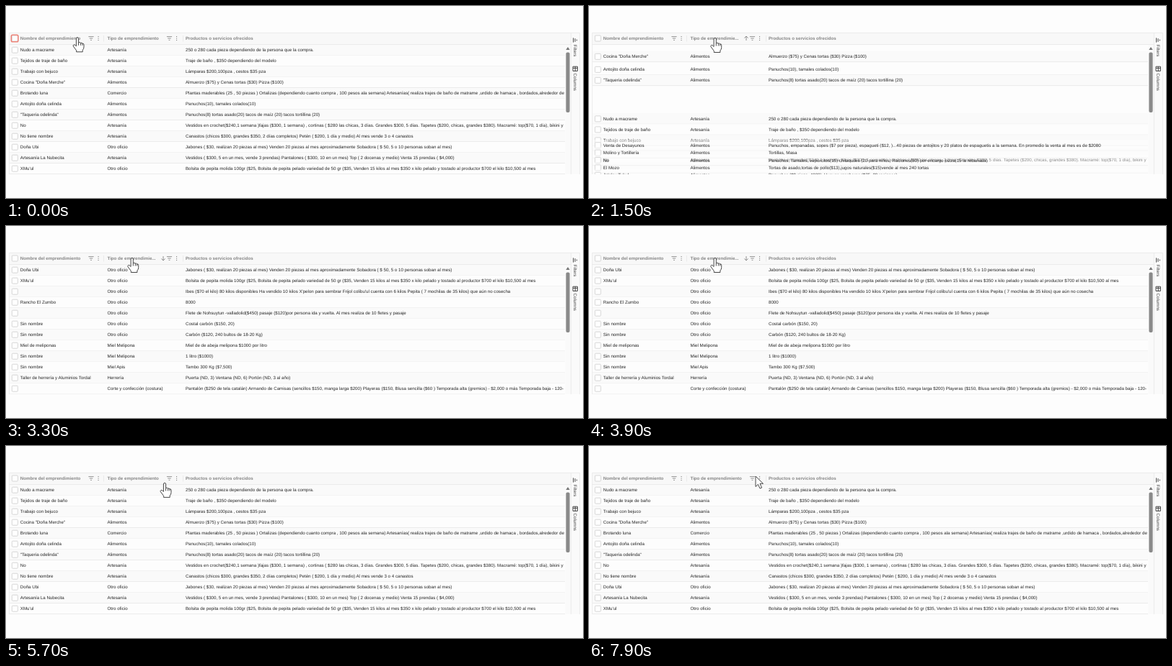
These frames come from a looping animation (800x267 px, 8000 ms). An HTML page:

```html
<!DOCTYPE html>
<html lang="es">
<head>
<meta charset="utf-8">
<title>Tabla de emprendimientos</title>
<style>
html, body { margin: 0; width: 100%; height: 100%; overflow: hidden; background: #fdfdfd; }
svg { display: block; width: 100vw; height: 100vh; }
text { font: 6.173px "Liberation Sans", Arial, sans-serif; fill: #262626; text-rendering: geometricPrecision; white-space: pre; }
.head text { font-weight: bold; fill: #858585; }
.icon { fill: none; stroke: #777; stroke-width: .8; }
.box { fill: #fff; stroke: #cdcdcd; stroke-width: .8; }
.line { stroke: #e8e8e8; stroke-width: .8; }
.side { fill: #444; }
.dark { stroke: #444; stroke-width: 1; }
.cursor { fill: #fff; stroke: #333; stroke-width: .9; stroke-linejoin: round; }
</style>
</head>
<body>
<svg viewBox="0 0 800 267">
  <defs>
    <clipPath id="body"><rect x="4" y="53.5" width="771" height="180.5"/></clipPath>
    <g id="menu">
      <path class="icon" d="M-3.6 -2.4H3.6M-2.2 0H2.2M-.9 2.4H.9"/>
      <path d="M9.5 -3h1.1v1.1h-1.1zM9.5 -.5h1.1v1.1h-1.1zM9.5 2h1.1v1.1h-1.1z" fill="#777"/>
    </g>
  </defs>
  <rect x="4.4" y="37.4" width="791.2" height="196.2" fill="#fdfdfd"/>
  <g id="rows" clip-path="url(#body)"></g>
  <g class="head">
    <rect x="4.4" y="37.4" width="779" height="16" fill="#f8f8f8"/>
    <path class="line" d="M4 53.5H783M135.5 41V49.5M245.5 41V49.5"/>
    <rect class="box" x="8.3" y="41" width="8" height="8" rx="1"/>
    <rect id="focus" x="7.3" y="40.2" width="9.6" height="9.6" rx="1.8" fill="none" stroke="#ee8378" stroke-width="1.5"/>
    <text x="19.8" y="47.3">Nombre del emprendimiento</text>
    <text id="type" x="140.5" y="47.3"></text>
    <text x="249" y="47.3">Productos o servicios ofrecidos</text>
    <use href="#menu" x="118" y="45"/>
    <use href="#menu" x="226.5" y="45"/>
    <path id="sort" class="icon" d="M0 3V-3M-2.6 -.4L0 -3L2.6 -.4"/>
  </g>
  <rect x="775.5" y="54" width="7.5" height="179.5" fill="#fafafa"/>
  <path d="M776.3 61L779 57L781.7 61Z" fill="#777"/>
  <rect x="776.4" y="64.5" width="5.2" height="83.5" rx="2" fill="#8a8a8a"/>
  <rect x="783.4" y="37.4" width="12.2" height="196.2" fill="#fafafa"/>
  <path class="line" d="M4.4 234V37.4H795.6V234M783.4 37V234" fill="none"/>
  <path class="icon dark" d="M786.6 44.4V50.6M789 45.2V49.8M791.4 46.7V48.3"/>
  <path class="icon dark" d="M786 84.2H792.4V90.4H786ZM786 86.4H792.4M789.2 84.2V90.4"/>
  <text class="side" transform="translate(786.7 53.6) rotate(90)">Filters</text>
  <text class="side" transform="translate(786.7 93.6) rotate(90)">Columns</text>
  <path id="hand" class="cursor" d="M-1.6 1.5Q-1.6 0 0 0T1.6 1.5V7Q3.5 6.2 4.6 7.6Q6.2 7 7 8.4Q9 8 9 10V13Q9 16 7.2 17.5V20H-1.4V18L-5.6 12.3Q-6.5 10.8 -5 10Q-3.6 9.6 -1.6 12ZM1.6 7V11M4.6 7.6V11M7 8.4V11"/>
  <path id="arrow" class="cursor" d="M0 0V14.5L3.4 11.3L6 17L8.6 16L6 10.3H10.5Z"/>
</svg>
<script>
const LOOP = 8000, MOVE = 400, PITCH = 15, FIRST = 61, OUTSIDE = 21;
const $ = id => document.getElementById(id);

// name, products, then the slot when unsorted, ascending, descending
const GROUPS = {
  "Otro oficio": [
    ["Doña Ubi", "Jabones ( $30, realizan 20 piezas al mes) Venden 20 piezas al mes aproximadamente Sobadora ( $ 50, 5 o 10 personas soban al mes)", 9, 22, 0],
    ["XMu'ul", "Bolsita de pepita molida 100gr ($25, Bolsita de pepita pelado variedad de 50 gr ($35, Venden 15 kilos al mes $350 x kilo pelado y tostado al productor $700 el kilo $10,500 al mes", 11, 22, 1],
    ["", "Ibes ($70 el kilo) 80 kilos disponibles Ha vendido 10 kilos X'pelon para sembrar Frijol colibu'ul cuenta con 6 kilos Pepita ( 7 mochilas de 35 kilos) que aún no cosecha", 17, 22, 2],
    ["Rancho El Zumbo", "8000", 18, 22, 3],
    ["", "Flete de Nohsuytun -valladolid($450) pasaje ($120)por persona ida y vuelta. Al mes realiza de 10 fletes y pasaje", 22, 22, 4],
    ["Sin nombre", "Costal carbón ($150, 20)", 22, 22, 5],
    ["Sin nombre", "Carbón ($120, 240 bultos de 18-20 Kg)", 22, 22, 6]
  ],
  "Miel Melipona": [
    ["Miel de meliponas", "Miel de de abeja melipona $1000 por litro", 22, 22, 7],
    ["Sin nombre", "1 litro ($1000)", 22, 22, 8]
  ],
  "Miel Apis": [["Sin nombre", "Tambo 300 Kg ($7,500)", 22, 22, 9]],
  "Herrería": [["Taller de herrería y Aluminios Tordal", "Puerta (ND, 3) Ventana (ND, 6) Portón (ND, 3 al año)", 22, 22, 10]],
  "Corte y confección (costura)": [
    ["", "Pantalón ($250 de tela catalán) Armando de Camisas (sencillos $150, manga larga $200) Playeras ($150, Blusa sencilla ($60 ) Temporada alta (gremios) - $2,000 o más Temporada baja - 120-", 22, 22, 11]
  ],
  "Artesanía": [
    ["Nudo a macrame", "250 o 280 cada pieza dependiendo de la persona que la compra.", 0, 8, 17],
    ["Tejidos de traje de baño", "Traje de baño , $350 dependiendo del modelo", 1, 9, 18],
    ["Trabajo con bejuco", "Lámparas $200,100pza , cestos $35 pza", 2, 10, 18],
    ["No", "Vestidos en crochet($240,1 semana )fajas ($300, 1 semana) , cortinas ( $280 las chicas, 3 días. Grandes $300, 5 días. Tapetes ($200, chicas, grandes $380). Macramé: top($70, 1 día), bikini y", 7, 11, 19],
    ["No tiene nombre", "Canastos (chicos $300, grandes $350, 2 días completos) Petén ( $200, 1 día y medio) Al mes vende 3 o 4 canastos", 8, 22, 20],
    ["Artesanía La Nubecita", "Vestidos ( $300, 5 en un mes, vende 3 prendas) Pantalones ( $300, 10 en un mes) Top ( 2 docenas y medio) Venta 15 prendas ( $4,000)", 10, 22, 20]
  ],
  "Comercio": [
    ["Brotando luna", "Plantas maderables (25 , 50 piezas ) Ortalizas (dependiendo cuanto compra , 100 pesos ala semana) Artesanías( realiza trajes de baño de matrame ,urdido de hamaca , bordados,alrededor de", 4, 22, 12]
  ],
  "Alimentos": [
    ["Cocina \"Doña Merche\"", "Almuerzo ($75) y Cenas tortas ($30) Pizza ($100)", 3, 0, 21],
    ["Antojito doña celinda", "Panuchos(10), tamales colados(10)", 5, 1, 21],
    ["\"Taqueria odelinda\"", "Panuchos(8) tortas asado(20) tacos de maíz (20) tacos tortillina (20)", 6, 2, 21],
    ["Venta de Desayunos", "Panuchos, empanadas, sopes ($7 por pieza), espagueti ($12, )...40 piezas de antojitos y 20 platos de espaguetis a la semana. En promedio la venta al mes es de $2080", 22, 3, 21],
    ["Molino y Tortillería", "Tortillas, Masa", 22, 4, 21],
    ["No", "Panuchos, Tamales, vaporcitos(15) chilaquiles (20 para niños) Raciones(80) por encargo pizza(15 la rebanada)", 22, 5, 21],
    ["El Mozo", "Tortas de asado,tortas de pollo($13),jugos naturales($15)vende al mes 240 tortas", 22, 6, 21],
    ["Je'elex Tukul", "Panuchos ($8 pieza, 4000), Huevos rancheros ($75, 20 raciones)", 22, 7, 21]
  ]
};

// start time, slot column before and after
const SORTS = [
  { at: 0, from: 0, to: 0 },
  { at: 1303, from: 0, to: 1 },
  { at: 2682, from: 1, to: 2 },
  { at: 5235, from: 2, to: 0 }
];
const STALL = [2700, 3100];

// time, x, y of the pointer tip
const PATH = [
  [0, 99, 43.8], [100, 99, 43.8], [850, 174.7, 44.5], [5350, 174.7, 44.5],
  [5680, 220, 51.4], [6500, 220, 51.4], [6750, 231, 42], [LOOP, 231, 42]
];
const ARROW_AT = 6650;

function add(parent, tag, attrs, label) {
  const el = document.createElementNS("http://www.w3.org/2000/svg", tag);
  for (const key in attrs) el.setAttribute(key, attrs[key]);
  if (label !== undefined) el.textContent = label;
  parent.append(el);
  return el;
}

const rows = Object.entries(GROUPS).flatMap(([type, list]) => list.map(([name, goods, ...slots]) => {
  const g = add($("rows"), "g", {});
  const back = add(g, "rect", { x: 4.8, y: -7.5, width: 771, height: 15 });
  add(g, "path", { class: "line", d: "M4.8 7.5H775" });
  add(g, "rect", { class: "box", x: 8.3, y: -3.8, width: 8, height: 8, rx: 1 });
  [[19.8, name], [140.5, type], [249, goods]].forEach(([x, s]) => add(g, "text", { x, y: 2.3 }, s));
  return { g, back, slots };
}));

const clamp = v => Math.min(1, Math.max(0, v));

// cubic-bezier(.25, .1, .25, 1)
function ease(x) {
  let lo = 0, hi = 1;
  for (let i = 0; i < 24; i++) {
    const s = (lo + hi) / 2;
    if (.75 * s * (1 - s) + s ** 3 < x) lo = s; else hi = s;
  }
  return .3 * lo * (1 - lo) ** 2 + 3 * lo * lo * (1 - lo) + lo ** 3;
}

function tip(t) {
  const i = PATH.findIndex(p => p[0] > t);
  const [a, b] = [PATH[i - 1], PATH[i]];
  const k = clamp((t - a[0]) / (b[0] - a[0]));
  const e = k * k * (3 - 2 * k);
  return [a[1] + (b[1] - a[1]) * e, a[2] + (b[2] - a[2]) * e];
}

function draw(t) {
  const now = t >= STALL[0] && t < STALL[1] ? STALL[0] : t;
  const sort = SORTS.findLast(s => s.at <= now);
  const age = now - sort.at;

  for (const { g, back, slots } of rows) {
    const a = slots[sort.from], b = slots[sort.to];
    const entering = a >= OUTSIDE && b < OUTSIDE;
    const local = entering ? age - 35 : age;
    const slot = a + (b - a) * ease(clamp(local / MOVE));
    g.setAttribute("transform", `translate(0 ${FIRST + PITCH * slot})`);
    back.setAttribute("fill", b % 2 ? "#fdfdfd" : "#fafafa");
    back.setAttribute("fill-opacity", entering ? clamp(local / 350) : 1);
  }

  $("type").textContent = sort.to ? "Tipo de emprendimie..." : "Tipo de emprendimiento";
  $("sort").setAttribute("visibility", sort.to ? "visible" : "hidden");
  $("sort").setAttribute("transform", `translate(218 45) scale(1 ${sort.to === 2 ? -1 : 1})`);
  $("focus").setAttribute("opacity", 1 - clamp((t - 100) / 200));

  const place = `translate(${tip(t).join(" ")})`;
  $("hand").setAttribute("transform", place);
  $("arrow").setAttribute("transform", place);
  $("hand").setAttribute("visibility", t < ARROW_AT ? "visible" : "hidden");
  $("arrow").setAttribute("visibility", t < ARROW_AT ? "hidden" : "visible");
}

const start = performance.now();
function tick() {
  draw((performance.now() - start) % LOOP);
  requestAnimationFrame(tick);
}
tick();
</script>
</body>
</html>
```
